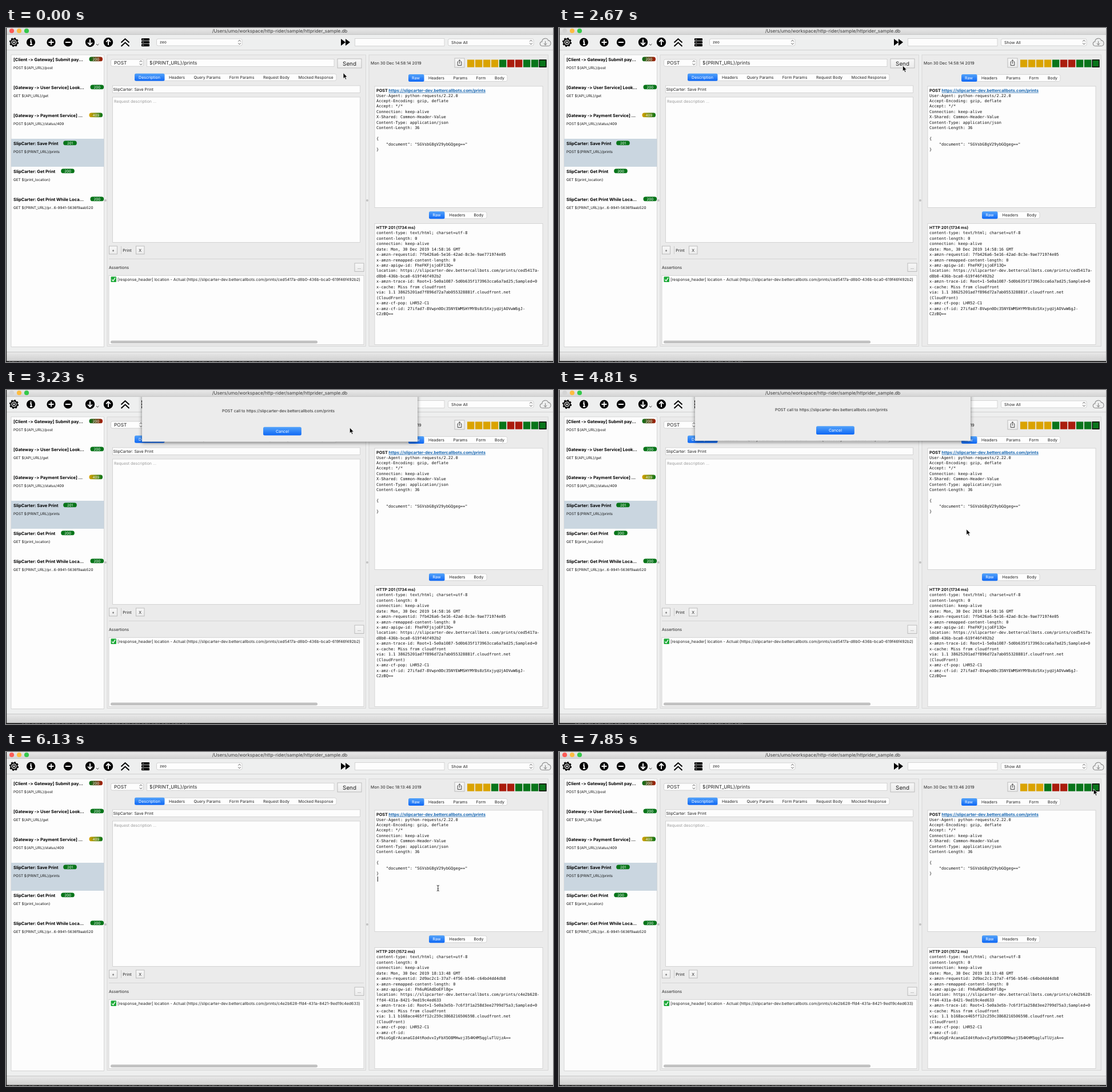
Animation of 957 by 585 pixels, one loop 8000 ms. Source, as an HTML page:

```html
<!DOCTYPE html>
<html lang="en">
<head>
<meta charset="utf-8">
<title>HTTP client</title>
<style>
html, body { margin: 0; width: 100%; height: 100%; overflow: hidden; background: #eee; }
svg { display: block; width: 957px; height: 585px; }
text { font-family: Inter, sans-serif; font-feature-settings: "calt" 0; white-space: pre; text-rendering: geometricPrecision; }
.mono { font-family: "DejaVu Sans Mono", monospace; }
</style>
</head>
<body>
<svg id="stage" viewBox="0 0 957 585"></svg>
<script>
const LOOP = 8000, HOST = 'https://slipcarter-dev.bettercallbots.com/prints';
const GREEN = '#08751a', RED = '#aa1c0c', GOLD = '#daa300', PAPER = '#fdfdfd';

// ---- drawing helpers, each returns SVG markup ----
const rect = (x, y, x2, y2, fill, more = '') =>
  `<rect x="${x}" y="${y}" width="${x2 - x}" height="${y2 - y}" fill="${fill}" ${more}/>`;
const box = (x, y, x2, y2, fill = PAPER, line = '#cdcdcd', rx = 0) =>
  rect(x + .5, y + .5, x2 - .5, y2 - .5, fill, `stroke="${line}" stroke-width=".8" rx="${rx}"`);
const path = (d, stroke = '#000', width = 1, fill = 'none', more = '') =>
  `<path d="${d}" fill="${fill}" stroke="${stroke}" stroke-width="${width}" ${more}/>`;
const circle = (x, y, r, fill = '#000', more = '') =>
  `<circle cx="${x}" cy="${y}" r="${r}" fill="${fill}" ${more}/>`;
const text = (x, y, str, size = 7, fill = '#222', more = '') =>
  `<text x="${x}" y="${y + size * .36}" font-size="${size}" fill="${fill}" ${more}>${str}</text>`;
const MID = 'text-anchor="middle"', BOLD = 'font-weight="700"';
const mid = (x, y, str, size, fill) => text(x, y, str, size, fill, MID);
const group = (id, body) => `<g id="${id}">${body}</g>`;

const button = (x, y, x2, y2, label, size = 7) =>
  box(x, y, x2, y2, 'url(#key)', '#b0b0b0') + mid((x + x2) / 2, (y + y2) / 2, label, size);
const updown = (x, y) =>
  path(`M${x - 2.2} ${y - 1.4}l2.2-2.4 2.2 2.4M${x - 2.2} ${y + 1.4}l2.2 2.4 2.2-2.4`, '#444', .9);
const combo = (x, x2, y, label, size) =>
  box(x, y - 6.5, x2, y + 6.5, PAPER, '#c8c8c8', 2.5) + updown(x2 - 5, y) + text(x + 6, y, label, size);

// Segmented tab bar; the first tab is selected
function tabs(x, x2, y, split, labels) {
  let s = box(x, y - 6.5, x2, y + 6.5, PAPER, '#cfcfcf', 3) +
    rect(x, y - 6.5, split, y + 6.5, 'url(#blue)', 'rx="2.5"');
  labels.forEach(([cx, label], i) => s += mid(cx, y, label, 7, i ? '#222' : '#fff'));
  return s;
}

function lines(x, y, rows) {
  return rows.map((row, i) => text(x, y + i * 9.48, row, 6.97, '#111', 'class="mono"')).join('');
}

function icons() {
  let s = circle(14, 25, 5.6, 'none', 'stroke="#000" stroke-width="2.2"') +
    circle(14, 25, 7.1, 'none', 'stroke="#000" stroke-width="2" stroke-dasharray="3 2.58"') +
    circle(14, 25, 2.4, 'none', 'stroke="#000" stroke-width="1.5"');
  for (const x of [43.5, 79, 108.5]) s += circle(x, 25, 7.6);
  for (const x of [147, 179]) s += circle(x, 25, 8.2);
  s += path('M42 23.8h2v5M42 29h4M79 20.5v9M74.5 25h9M104 25h9', '#fff', 1.8) + circle(43.5, 21.2, 1.2, '#fff');
  s += path('M147 20v9M143.2 25.6l3.8 4 3.8-4M179 30v-9M175.2 24.4l3.8-4 3.8 4', '#fff', 1.9);
  s += path('M158 28l2.2 2.2 2.2-2.2', '#333', 1);
  s += path('M201.5 25.5l7-6.5 7 6.5M201.5 32l7-6.5 7 6.5', '#000', 2);
  for (const y of [18, 23, 28]) s += rect(237, y, 251, y + 4.2, '#000', 'rx="1"') + circle(239.8, y + 2.1, .8, '#fff');
  s += path('M586 19l8 6-8 6zM594 19l8 6-8 6z', 'none', 0, '#000');
  s += path('M939 31.5c-6 0-6-7-1.2-7.6 0-6.5 9.2-7.6 10.8-2 5.4-.4 6.4 9.2 0 9.6zM943.6 23v6.5M941 27l2.6 2.8 2.6-2.8', '#8a8a8a', 1.1);
  return s;
}

function sidebar() {
  const rows = [
    ['[Client -> Gateway] Submit pay...', 'POST ${API_URL}/post', 200, 157.3, 'url(#mixRed)'],
    ['[Gateway -> User Service] Look...', 'GET ${API_URL}/get', 200, 159.3, GREEN],
    ['[Gateway -> Payment Service] ...', 'POST ${API_URL}/status/409', 409, 157.3, 'url(#mixGold)'],
    ['SlipCarter: Save Print', 'POST ${PRINT_URL}/prints', 201, 112, GREEN],
    ['SlipCarter: Get Print', 'GET ${print_location}', 200, 108, GREEN],
    ['SlipCarter: Get Print While Loca...', 'GET ${PRINT_URL}/pr...6-9941-5636f9aab520', 200, 159.3, GREEN]
  ];
  let s = box(8.5, 46.5, 172, 559) + rect(9, 194, 171.5, 243, '#cad6e0');
  rows.forEach(([name, url, code, x, fill], i) => {
    const y = 55 + i * 49;
    s += text(13, y, name, 7.5, '#000', BOLD) + text(13, y + 14.6, url, 6.35, '#111') +
      rect(x - 11.8, y - 4.5, x + 11.8, y + 3.3, fill, 'rx="3.9"') + mid(x, y - .6, code, 6.2, '#fff');
  });
  return s;
}

function editor() {
  return box(176.5, 46.5, 630, 558, '#ebebeb', '#d3d3d3') +
    combo(183, 241, 61, 'POST', 8.4) +
    box(246, 54, 574.5, 68) + text(251, 61, '${PRINT_URL}/prints', 8.5) +
    button(579.5, 53.5, 622.5, 70.5, 'Send', 9.8) +
    tabs(225, 578.5, 86.3, 277.5, [[251, 'Description'], [299, 'Headers'], [352, 'Query Params'],
      [412.5, 'Form Params'], [473, 'Request Body'], [542, 'Mocked Response']]) +
    box(186, 100.5, 620, 114) + text(187.5, 107.3, 'SlipCarter: Save Print') +
    box(186, 120.5, 620, 376) + text(189, 128, 'Request description ...', 7, '#9a9a9a') +
    button(180, 381.5, 195, 396.5, '+') + path('M201.5 382v14', '#c4c4c4', .8) +
    mid(212, 389, 'Print') + button(227, 381.5, 242.5, 396.5, 'X') +
    path('M180 404.5H626', '#d0d0d0', .8) +
    text(180, 419.5, 'Assertions') + button(609.5, 411.5, 626.5, 427, '...') +
    box(179.5, 433, 626.5, 555) + rect(183, 547.5, 545, 552.5, '#c1c1c1', 'rx="2.5"') +
    rect(183.5, 435.5, 193, 445, '#1faa3a', 'rx="1"') + path('M185.4 440.6l2 2.3 3.8-5.5', '#fff', 1.4);
}

function inspector() {
  return box(634.5, 46.5, 949, 558, '#ebebeb', '#d3d3d3') +
    box(784.5, 52.5, 802.5, 69.5, 'url(#key)', '#b0b0b0') +
    path('M791.8 59h-1.6v6.5h6.6V59h-1.6M793.5 62.5v-6.5M791.7 57.6l1.8-1.9 1.8 1.9', '#222', .8) +
    tabs(704, 877.5, 87.5, 731.5, [[717, 'Raw'], [753, 'Headers'], [795, 'Params'], [831, 'Form'], [863.5, 'Body']]) +
    box(644.5, 101.5, 939.5, 315) +
    text(648, 109.3, `POST <tspan fill="#1565b0" text-decoration="underline">${HOST}</tspan>`, 7.25, '#111', BOLD) +
    lines(648, 118, ['User-Agent: python-requests/2.22.0', 'Accept-Encoding: gzip, deflate', 'Accept: */*',
      'Connection: keep-alive', 'X-Shared: Common-Header-Value', 'Content-Type: application/json',
      'Content-Length: 36', '', '{', '    "document": "SGVsbG8gV29ybGQgeg=="', '}']) +
    tabs(740, 841.5, 327.8, 767.5, [[753.5, 'Raw'], [789.5, 'Headers'], [827, 'Body']]) +
    box(644.5, 342, 939.5, 555);
}

// Everything that depends on the last response
function result(id, r) {
  let s = text(638, 61.5, `Mon 30 Dec ${r.sent} 2019`, 7.1);
  [...r.history].forEach((c, i) => {
    const x = 807 + i * 14;
    s += rect(x, 55.5, x + 12.4, 68.7, { y: GOLD, g: GREEN, r: RED }[c]);
  });
  s += rect(933.2, 56, 944.9, 68.2, 'none', 'stroke="#000" stroke-width="1.4"');
  s += text(195, 440.5, `[response_header] location - Actual:(${HOST}/${r.print.join('')})`);
  s += text(648, 349.6, `HTTP 201 (${r.ms} ms)`, 7, '#111', BOLD);
  s += lines(648, 358.6, ['content-type: text/html; charset=utf-8', 'content-length: 0', 'connection: keep-alive',
    `date: Mon, 30 Dec 2019 ${r.got} GMT`, `x-amzn-requestid: ${r.request}`, 'x-amzn-remapped-content-length: 0',
    `x-amz-apigw-id: ${r.api}`, `location: ${HOST}/${r.print[0]}`, r.print[1],
    `x-amzn-trace-id: Root=${r.trace};Sampled=0`, 'x-cache: Miss from cloudfront',
    `via: 1.1 ${r.via}.cloudfront.net`, '(CloudFront)', 'x-amz-cf-pop: LHR52-C1', ...r.cf]);
  return group(id, s);
}

const before = {
  sent: '14:58:14', got: '14:58:16', ms: 1734, history: 'yyyygrrggg',
  print: ['ced5417a-', 'd8b0-436b-bca0-619f46f492b2'],
  request: '7fb426a6-5e16-42ad-8c3e-9ae771974e05', api: 'FheFKFjsjoEF13Q=',
  trace: '1-5e0a1087-5d0b635f173963cca6a7ad25', via: '38625201ad7f896d72a7ab055328881f',
  cf: ['x-amz-cf-id: 27ifad7-8Vwpn0Dc35NYEWMSHYMYBs0z5XxjyqUjAOVwW6gJ-', 'C2zBQ==']
};
const after = {
  sent: '18:13:46', got: '18:13:48', ms: 1572, history: 'yyygrrgggg',
  print: ['c4e2b628-', 'ffd4-431a-8421-9ed19c4ed633'],
  request: '2d9ac2c1-37a7-4f56-b546-c64bd4dd4db8', api: 'Fh6uRGAdDoEFl8g=',
  trace: '1-5e0a3e5b-7c6f3f1a258d3ee2799d75a3', via: 'b168ace465ff12c259c3868216506598',
  cf: ['x-amz-cf-id:', 'cPbioGgErAcanaGId4tRodvxIyFbX5O8MHwzj354KHM5qgluTlUjzA==']
};

const gradient = (id, a, b, dir = 'x2="0" y2="1"') =>
  `<linearGradient id="${id}" ${dir}><stop stop-color="${a}"/><stop offset="1" stop-color="${b}"/></linearGradient>`;

const $ = id => document.getElementById(id);
$('stage').innerHTML =
  '<defs>' + gradient('bar', '#e9e9e9', '#d3d3d3') + gradient('foot', '#e9e9e9', '#cfcfcf') +
  gradient('key', '#f8f8f8', '#ebebeb') + gradient('blue', '#54a3fa', '#0f68f5') +
  gradient('mixRed', GREEN, RED, '') + gradient('mixGold', GOLD, GREEN, '') +
  '<clipPath id="below"><path d="M0 12H957V585H0z"/></clipPath></defs>' +
  rect(0, 0, 957, 585, '#eeefef') + rect(0, 0, 957, 11.5, 'url(#bar)') + path('M0 11.5H957', '#c2c2c2', .8) +
  path('M0 38.7H957', '#c6c6c6', .8) +
  group('close', circle(10, 5, 4.1, '#fc5b57')) + circle(23, 5, 4.1, '#fdbc40') + circle(36, 5, 4.1, '#34c84a') +
  mid(479, 5.5, '/Users/umo/workspace/http-rider/sample/httprider_sample.db', 8.03, '#3c3c3c') +
  icons() + combo(263, 413.5, 25, 'zeo', 6.9) + box(610, 18, 767.5, 32) + combo(773, 923.5, 25, 'Show All', 7) +
  sidebar() + editor() + inspector() +
  circle(174, 302, 2, '#c2c2c2') + circle(632, 302, 2, '#c2c2c2') +
  result('old', before) + result('new', after) + path('M650.3 218v9', '#000', .9, 'none', 'id="caret"') +
  rect(0, 567.5, 957, 583.5, 'url(#foot)') + path('M0 567.5H957', '#bdbdbd', .8) +
  rect(0, 583.3, 957, 585, '#151515') + rect(0, 0, 1.2, 585, '#222') +
  path('', '#777', .7, 'none', 'id="behind" stroke-dasharray="3 2 5 1.5 2 4"') +
  '<g clip-path="url(#below)">' + group('sheet',
    rect(238, -40, 720, 90.5, '#ececec', 'style="filter:drop-shadow(0 2px 3px #0007)"') +
    mid(476.5, 36.2, `POST call to ${HOST}`) +
    rect(450, 64.8, 516.8, 79.5, 'url(#blue)', 'rx="2.5"') + mid(483.4, 72, 'Cancel', 7, '#fff')) + '</g>' +
  group('arrow', path('M0 0V10.2L2.3 8 4 11.8 5.7 11 4.1 7.4H7.2Z', '#fff', .8, '#000')) +
  group('beam', path('M-2-5Q0-5 0-3.5Q0-5 2-5M0-4V4M-2 5Q0 5 0 3.5Q0 5 2 5M-1 1H1', '#222', .9));

// Last entry whose time has come
const at = (steps, t) => steps.filter(s => s[0] <= t).pop();

const sheetSteps = [[0, null], [2820, -79], [2960, -65.5], [3230, 0], [4810, -1.6], [5020, -65.5], [5200, null]];
const moves = [[0, 590, 78.5], [150, 595.5, 74], [300, 598.5, 71], [1410, 600, 68], [1560, 601.3, 65.8],
  [4360, 660, 158], [4510, 712.8, 243.7], [5680, 742, 245], [5830, 755.8, 244.5], [6130, 755.8, 238.5], [6280, 755, 201.5]];
// Sweep up to the history bar in seven eased steps
for (let i = 1; i <= 7; i++) {
  const k = i / 7, e = k * k * (3 - 2 * k);
  moves.push([6570 + (i - 1) * 158.3, 755 + 172 * e, 201.5 - 145 * e]);
}
moves.push([7670, 933, 61], [7850, 935.3, 64.8]);

const show = (id, on) => $(id).style.display = on ? '' : 'none';

function render(t) {
  const dy = at(sheetSteps, t)[1], modal = t >= 2670 && t < 5200;
  show('sheet', dy !== null);
  $('sheet').setAttribute('transform', `translate(0 ${dy || 0})`);
  $('close').firstChild.setAttribute('fill', modal ? '#d4d4d4' : '#fc5b57');
  $('behind').setAttribute('d', modal ? 'M28 584.5H322' : 'M5 584.5H950');
  show('old', t < 5200);
  show('new', t >= 5200);
  show('caret', t >= 6130 && t < 6570 || t >= 7045 && t < 7670);
  const [, x, y] = at(moves, t), beam = t >= 5680 && y > 102;
  show('beam', beam);
  show('arrow', !beam);
  $(beam ? 'beam' : 'arrow').setAttribute('transform', `translate(${x} ${y})`);
}

const start = performance.now();
function tick() {
  render((performance.now() - start) % LOOP);
  requestAnimationFrame(tick);
}
tick();
</script>
</body>
</html>
```
